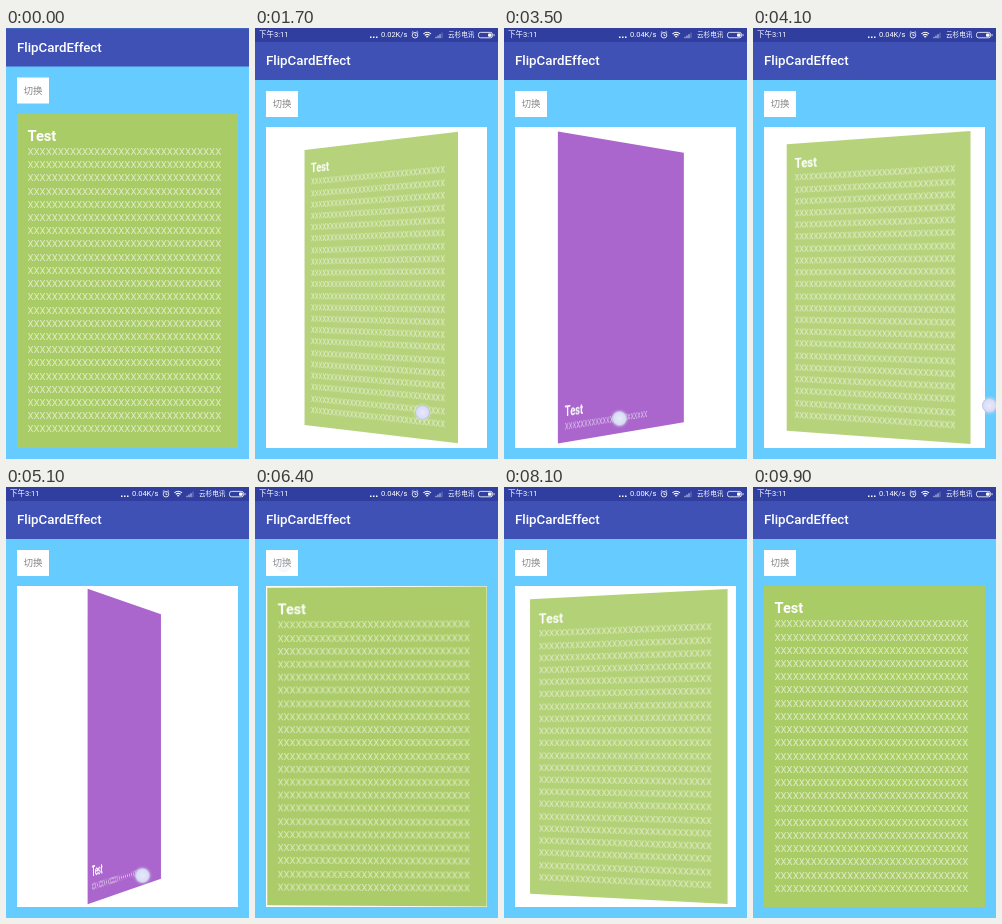
Write an HTML page that moves like this. It is 243 px wide and 431 px high and loops after 10000 ms.

```html
<!DOCTYPE html>
<html lang="en">
<head>
<meta charset="utf-8">
<title>Card flip</title>
<style>
html, body { margin: 0; width: 100%; height: 100%; overflow: hidden; }
#stage { position: relative; width: 243px; height: 431px; overflow: hidden; background: #66ccff;
  font-family: Roboto, "Noto Sans CJK SC", "Noto Sans CJK", sans-serif; color: #fff; }
#stage div, #stage span { position: absolute; box-sizing: border-box; white-space: nowrap; }
#top { left: 0; top: 0; width: 100%; height: 90px; }
#status { left: 0; top: 0; width: 100%; height: 14px; background: #303f9f; font-size: 7.5px; line-height: 14px; }
#status span { top: 0; }
#status svg { position: absolute; left: 0; top: 0; fill: none; stroke: #fff; stroke-width: .8; }
#bar { left: 0; top: 14px; width: 100%; height: 38px; background: #3f51b5; }
#bar span { left: 11px; top: 0; line-height: 38px; font-size: 13.3px; font-weight: 500; }
#button { left: 11px; top: 63px; width: 32px; height: 26px; background: #fff; color: #888;
  font-size: 9.5px; line-height: 26px; text-align: center; }
#box { left: 11px; bottom: 11px; width: 221px; background: #fff; perspective: 1050px; }
.card { left: 0; top: 0; width: 100%; height: 100%; }
.card b { position: absolute; left: 10.5px; font-size: 14.6px; line-height: 20px; }
#stage .rows { left: 10.5px; overflow: hidden; white-space: pre; font-size: 9.66px; line-height: 13.22px;
  color: #ffffff9c; }
#front { background: #aacc66; }
#front b { top: 12px; }
#front .rows { top: 31.4px; bottom: 12px; }
#back { background: #aa66cc; }
#back b { bottom: 22px; }
#back .rows { bottom: 9.5px; }
#dot { width: 15px; height: 15px; margin: -7.5px; border-radius: 50%; border: 1px solid #bbbfdcaa;
  background: radial-gradient(#e9e9fb, #cfd5f4); box-shadow: 0 0 3px #fff9; }
</style>
</head>
<body>
<div id="stage">
  <div id="box">
    <div id="front" class="card"><b>Test</b><div class="rows"></div></div>
    <div id="back" class="card"><b>Test</b><div class="rows"></div></div>
  </div>
  <div id="top">
    <div id="bar"><span>FlipCardEffect</span></div>
    <div id="button">切换</div>
    <div id="status">
      <span style="left:4px">下午3:11</span>
      <span id="speed" style="left:126px"></span>
      <span style="left:193px;font-size:6.6px">云杉电讯</span>
      <svg width="243" height="14">
        <path d="M115 9.3h7.5" stroke-width="1.5" stroke-dasharray="1.5"/>
        <circle cx="160" cy="7.2" r="2.8"/>
        <path d="M160 5.5v2h1.4M156.8 4.6l1.5-1.3M163.2 4.6l-1.5-1.3"/>
        <path d="M168.4 5.8q3.8-3.2 7.6 0M169.8 7.4q2.4-2 4.8 0M171.2 9q1-.8 2 0" stroke-width="1.1"/>
        <path d="M181 10.2v-1.4M183 10.2v-2.6M185 10.2v-4"/>
        <path d="M187 10.2v-5.6" opacity=".4"/>
        <rect x="223.5" y="4.4" width="14" height="5.4" rx="2"/>
        <path d="M239 6v2.2"/>
        <rect x="233" y="5.4" width="3.6" height="3.4" rx="1" fill="#fff" stroke="none"/>
      </svg>
    </div>
  </div>
  <div id="dot"></div>
</div>
<script>
const $ = id => document.getElementById(id);
const LOOP = 10000, STEP = 100;
const START_X = 215, DEG_PER_PX = .845;
const TAPS = [6300, 7500];

const [frontRows, backRows] = document.querySelectorAll('.rows');
frontRows.textContent = Array(22).fill('X'.repeat(32)).join('\n');
backRows.textContent = 'X'.repeat(23);

const ramp = (t, from, to) => Math.min(1, Math.max(0, (t - from) / (to - from)));
const easeOut = p => 1 - (1 - p) ** 2;
const easeInOut = p => (1 - Math.cos(Math.PI * p)) / 2;
const dragging = t => (t >= 1400 && t <= 2400) || (t >= 3200 && t <= 5500);

// Swipe left, then one long drag: right, left and back right
const fingerX = t => START_X - 160 * ramp(t, 1400, 2400) + 181 * ramp(t, 3200, 4100)
  - 118 * ramp(t, 4400, 5000) + 90 * ramp(t, 5000, 5500);

// The card follows the finger, and settles on a face when released
function turn(t) {
  const follow = time => DEG_PER_PX * (START_X - fingerX(time));
  const toBack = 180 - follow(2400);
  const toFront = follow(5500) + toBack;
  const drag = follow(t) + toBack * easeOut(ramp(t, 2400, 3000)) - toFront * easeOut(ramp(t, 5500, 6100));
  const [there, back] = TAPS.map(tap => easeInOut(ramp(t, tap + 50, tap + 750)));
  return drag + 180 * (there - back);
}

function pose(card, angle, visible) {
  const r = Math.abs(angle) * Math.PI / 180;
  const depth = 103.5 * Math.sin(r) + 36.3 * Math.sin(2 * r);
  card.style.display = visible ? 'block' : 'none';
  card.style.transform = r > .001 ? `translateZ(${-depth}px) rotateY(${angle}deg)` : 'none';
}

function drawTouch(t) {
  const dot = $('dot').style;
  const tap = TAPS.find(start => t >= start && t < start + 200);
  const x = tap ? 28 : fingerX(t);
  dot.left = x + 'px';
  dot.top = (tap ? 77 : 403 - .11 * x) + 'px';
  dot.opacity = tap ? .5 - (t - tap) / 300 : +dragging(t);
}

function draw(t) {
  const shift = 13.5 * (ramp(t, 0, 500) - 1);
  $('top').style.transform = `translateY(${shift}px)`;
  $('box').style.height = 321 - shift + 'px';

  const angle = turn(t);
  pose($('front'), -angle, angle < 90);
  pose($('back'), 180 - angle, angle >= 90);
  $('front').style.opacity = 1 - .14 * ramp(angle, 0, 27);

  const speed = t < 1000 ? 0 : t < 3200 ? .02 : t < 6800 ? .04 : t < 9300 ? 0 : .14;
  $('speed').textContent = speed.toFixed(2) + 'K/s';
  drawTouch(t);
}

const start = performance.now();
function tick() {
  const t = (performance.now() - start) % LOOP;
  draw(Math.floor(t / STEP) * STEP);
  requestAnimationFrame(tick);
}
tick();
</script>
</body>
</html>
```
